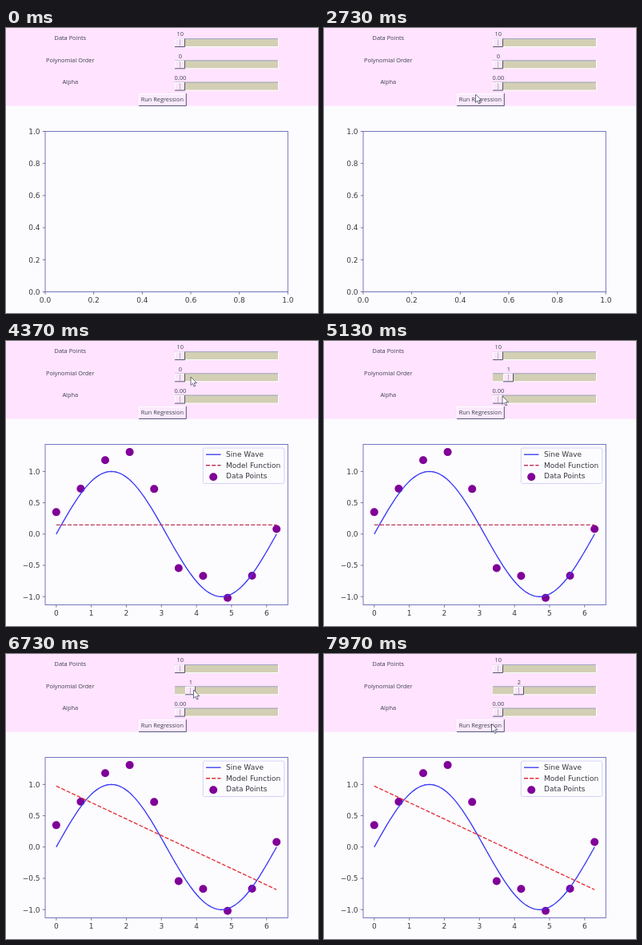
An HTML page for the animation above (8000 ms loop, 390 px wide and 357 px high).

```html
<!DOCTYPE html>
<html lang="en">
<head>
<meta charset="utf-8">
<title>Polynomial regression</title>
<style>
  html, body { margin: 0; width: 100%; height: 100%; overflow: hidden; background: #fcfcff; }
  svg { display: block; width: 390px; height: 357px; }
  .ui { font: 7.4px "Open Sans", "Noto Sans", sans-serif; fill: #3c3f4c; text-anchor: middle; }
  .plot { font: 9px "DejaVu Sans", sans-serif; fill: #36363f; }
</style>
</head>
<body>
<svg id="stage" viewBox="0 0 390 357"></svg>
<script>
const DURATION = 8000;
const stage = document.getElementById('stage');

function add(parent, tag, attrs = {}, text) {
  const node = document.createElementNS('http://www.w3.org/2000/svg', tag);
  for (const key in attrs) node.setAttribute(key, attrs[key]);
  if (text !== undefined) node.textContent = text;
  parent.appendChild(node);
  return node;
}
const group = (parent, attrs) => add(parent, 'g', attrs);
const rect = (parent, x, y, width, height, attrs) =>
  add(parent, 'rect', { x, y, width, height, ...attrs });
const path = (parent, d, stroke, width = 1, attrs) =>
  add(parent, 'path', { d, stroke, 'stroke-width': width, fill: 'none', ...attrs });
const label = (parent, x, y, text, attrs) => add(parent, 'text', { x, y, ...attrs }, text);

// Control panel
rect(stage, 0, 0, 390, 357, { fill: '#fcfcff' });
rect(stage, 0, 0, 390, 97.5, { fill: '#ffe3ff' });
const ui = group(stage, { class: 'ui' });

function slider(name, y, value) {
  label(ui, 80.3, y + 2.4, name);
  rect(ui, 211, y, 129.5, 10.5, { fill: '#d2cfb4' });
  path(ui, `M211 ${y + .5}H340`, '#a3a3c4');
  path(ui, `M211 ${y + 10.5}H340.5V${y}`, '#fff');
  const thumb = group(ui);
  rect(thumb, 211, y + .5, 13, 10.5, { fill: '#fbe6fb' });
  path(thumb, `M211.5 ${y + 10}V${y + 1}H223`, '#fff');
  path(thumb, `M211 ${y + 10.5}H223.5V${y + .5}`, '#55556a');
  path(thumb, `M217.5 ${y + 1.5}V${y + 9.5}`, '#aaa2b4', .8);
  const readout = label(thumb, 217.8, y - 2.7, value);
  return step => {
    thumb.setAttribute('transform', `translate(${step * 13} 0)`);
    readout.textContent = step;
  };
}
slider('Data Points', 13, '10');
const setOrder = slider('Polynomial Order', 40.3, '0');
slider('Alpha', 67.6, '0.00');

rect(ui, 166, 82, 59.5, 16, { fill: '#fbeafd' });
const buttonLight = path(ui, 'M166.5 97V82.5H225');
const buttonDark = path(ui, 'M166 97.4H225.3V82');
const buttonText = label(ui, 195.3, 92.4, 'Run Regression');

// Charts
const box = { left: 49, right: 352.3, top: 129.5, bottom: 330.5 };
const sx = x => 62.8 + x * 43.83;
const sy = y => 241.8 - y * 78.4;

function axes(xTicks, yTicks) {
  const g = group(stage, { class: 'plot' });
  const ticks = group(g);
  for (const [x, text] of xTicks) {
    path(ticks, `M${x} ${box.bottom}v3.2`, '#555577', .8);
    label(ticks, x, 344.2, text, { 'text-anchor': 'middle' });
  }
  for (const [y, text] of yTicks) {
    path(ticks, `M${box.left} ${y}h-3.2`, '#555577', .8);
    label(ticks, 42.6, y + 3.3, text, { 'text-anchor': 'end' });
  }
  return g;
}
const frame = g => rect(g, box.left, box.top, box.right - box.left, box.bottom - box.top,
  { fill: 'none', stroke: '#6666b8', 'stroke-width': .9 });

const fifths = [0, 1, 2, 3, 4, 5].map(i => i / 5);
const emptyChart = axes(
  fifths.map(v => [box.left + v * 303.3, v.toFixed(1)]),
  fifths.map(v => [box.bottom - v * 201, v.toFixed(1)]));
frame(emptyChart);

const chart = axes(
  [0, 1, 2, 3, 4, 5, 6].map(v => [sx(v), v]),
  [-1, -.5, 0, .5, 1].map(v => [sy(v), v.toFixed(1).replace('-', '\u2212')]));
const samples = [.35, .725, 1.18, 1.31, .72, -.545, -.67, -1.02, -.665, .08]
  .map((y, i) => ({ x: i * 2 * Math.PI / 9, y }));
const dot = (x, y) => add(chart, 'circle', { cx: x, cy: y, r: 5, fill: '#800098' });
samples.forEach(p => dot(sx(p.x), sy(p.y)));

let wave = '';
for (let i = 0; i <= 100; i++) {
  const x = i * Math.PI / 50;
  wave += `${i ? 'L' : 'M'}${sx(x).toFixed(2)} ${sy(Math.sin(x)).toFixed(2)}`;
}
path(chart, wave, '#3a3af5', 1.35);
const dashes = { 'stroke-dasharray': '5 2.16' };
const model = path(chart, '', '', 1.35, dashes);
frame(chart);

rect(chart, 246.3, 134, 101.5, 44.5, { rx: 2, fill: '#fcfcff', stroke: '#d0d0f4', 'stroke-width': .9 });
path(chart, 'M250 142.2H268.5', '#3a3af5', 1.35);
const modelKey = path(chart, 'M250 155.7H268.5', '', 1.35, dashes);
dot(259.2, 170.2);
['Sine Wave', 'Model Function', 'Data Points'].forEach((text, i) =>
  label(chart, 275, 145.4 + i * 13.4, text));

// Least-squares line through the samples, flat for order 0
function fitPath(order) {
  const mean = key => samples.reduce((sum, p) => sum + p[key], 0) / samples.length;
  const mx = mean('x'), my = mean('y');
  let sxy = 0, sxx = 0;
  for (const p of samples) {
    sxy += (p.x - mx) * (p.y - my);
    sxx += (p.x - mx) ** 2;
  }
  const slope = order ? sxy / sxx : 0;
  const at = x => `${sx(x)} ${sy(my + slope * (x - mx))}`;
  return `M${at(0)}L${at(2 * Math.PI)}`;
}
const fits = [fitPath(0), fitPath(1)];
const fitColors = ['#bf3558', '#e62c34'];

// Pointer
const pointer = path(stage, 'M0 0V10.4L2.4 8.2L4 12L5.7 11.3L4.1 7.6H7.4Z', '#4c4c66', .8,
  { fill: '#fff', 'stroke-linejoin': 'round' });
const route = [ // time, x, y
  [1770, 332, 357], [2320, 191, 58], [2570, 189.5, 83], [3250, 189.5, 83],
  [3620, 231, 45], [5020, 231, 45], [5130, 223, 69], [5400, 196, 86],
  [5970, 196, 86], [6450, 233, 46], [6730, 234.5, 45], [6980, 241, 43],
  [7630, 241, 43], [7950, 209.5, 87.5], [8000, 209.5, 87.5]
];
function pointerAt(t) {
  const i = route.findIndex(stop => stop[0] > t);
  if (i < 1) return null;
  const [t0, x0, y0] = route[i - 1], [t1, x1, y1] = route[i];
  const k = (t - t0) / (t1 - t0), e = k * k * (3 - 2 * k);
  return [x0 + (x1 - x0) * e, y0 + (y1 - y0) * e];
}

const between = (t, a, b) => t >= a && t < b;
const show = (node, on) => node.setAttribute('visibility', on ? 'visible' : 'hidden');

function render(t) {
  setOrder(t < 4400 ? 0 : t < 7050 ? 1 : 2);

  const pressed = between(t, 2850, 2960) || between(t, 5580, 5700);
  buttonLight.setAttribute('stroke', pressed ? '#666680' : '#fff');
  buttonDark.setAttribute('stroke', pressed ? '#fff' : '#505078');
  buttonText.setAttribute('transform', pressed ? 'translate(.6 .6)' : '');

  const plotted = t >= 2950;
  show(emptyChart, !plotted);
  show(chart, plotted);
  const order = t < 5700 ? 0 : 1;
  model.setAttribute('d', fits[order]);
  model.setAttribute('stroke', fitColors[order]);
  modelKey.setAttribute('stroke', fitColors[order]);

  const spot = pointerAt(t);
  show(pointer, spot);
  if (spot) pointer.setAttribute('transform', `translate(${spot[0]} ${spot[1]})`);
}

const start = performance.now();
function tick() {
  render((performance.now() - start) % DURATION);
  requestAnimationFrame(tick);
}
tick();
</script>
</body>
</html>
```
